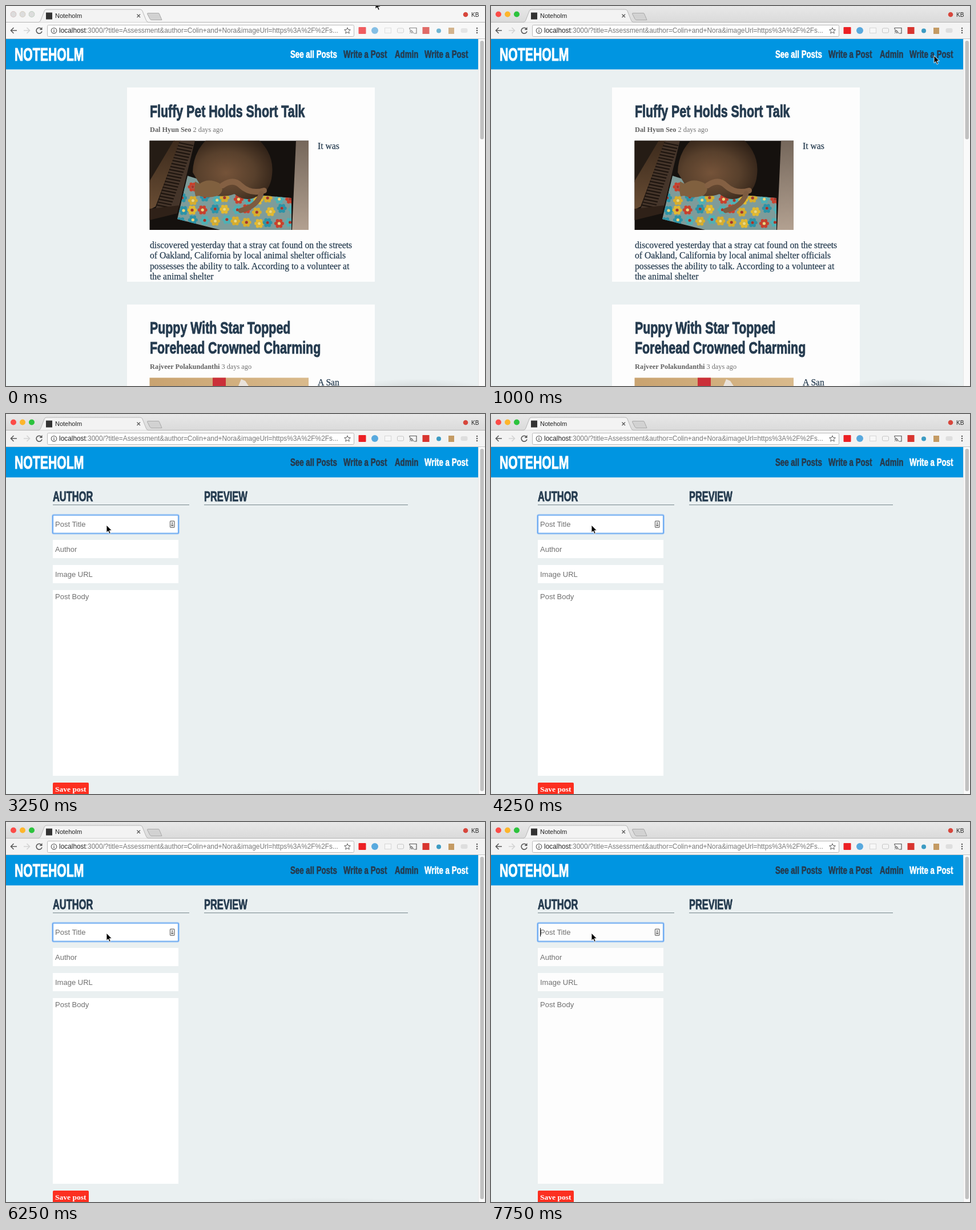
Write an HTML page that moves like this. It is 839 px wide and 667 px high and loops after 8000 ms.

```html
<!DOCTYPE html>
<html lang="en">
<head>
<meta charset="utf-8">
<title>Noteholm</title>
<style>
  html, body { margin: 0; width: 100%; height: 100%; overflow: hidden; background: #eaf0f1; }
  svg { display: block; }
  .ui { font-family: "Liberation Sans", Arial, sans-serif; }
  .serif { font-family: "Liberation Serif", "Times New Roman", serif; }
  .body { font-family: "Liberation Serif", "Times New Roman", serif; stroke: #263c50; stroke-width: .25; }
  .head { font-family: "Liberation Sans", Arial, sans-serif; font-weight: 700; }
  .line { fill: none; stroke: #5a5a5a; stroke-width: 1.6; }
</style>
</head>
<body>
<svg id="stage" width="839" height="667" viewBox="0 0 839 667"></svg>
<script>
const LOOP = 8000;
const INK = '#263c50';
const MIXED = 0.737, CAPS = 0.685; // narrow display face

const rect = (x, y, w, h, fill, more = '') =>
  `<rect x="${x}" y="${y}" width="${w}" height="${h}" fill="${fill}" ${more}/>`;
const circle = (x, y, r, fill, more = '') =>
  `<circle cx="${x}" cy="${y}" r="${r}" fill="${fill}" ${more}/>`;
const poly = (points, fill) => `<polygon points="${points}" fill="${fill}"/>`;
const path = (d, more) => `<path d="${d}" ${more}/>`;
const text = (kind, x, y, size, fill, str, more = '') =>
  `<text class="${kind}" x="${x}" y="${y}" font-size="${size}" fill="${fill}" ${more}>${str}</text>`;
// Heavy face: the outline thickens with the type size.
const head = (x, y, size, fill, str, narrow = MIXED, more = '') =>
  `<text class="head" transform="translate(${x} ${y}) scale(${narrow} 1)" font-size="${size}" fill="${fill}"
    stroke="${fill}" stroke-width="${size * 0.035}" ${more}>${str}</text>`;

function seeded(seed) {
  return () => (seed = (seed * 16807) % 2147483647) / 2147483647;
}

function defs() {
  const fade = (id, a, b, dir = 'x2="0" y2="1"') =>
    `<linearGradient id="${id}" ${dir}><stop stop-color="${a}"/><stop offset="1" stop-color="${b}"/></linearGradient>`;
  return `<defs>
    ${fade('strip', '#e8e8e8', '#dadada')}
    ${fade('wall', '#75675b', '#b3a191')}
    ${fade('plank', '#3c2a1c', '#694d34')}
    ${fade('straw', '#c9a370', '#d9ba8c', 'x2="1"')}
    <radialGradient id="fur" cx=".42" cy=".55" r=".72">
      <stop stop-color="#755339"/><stop offset=".5" stop-color="#58402c"/><stop offset="1" stop-color="#261a12"/>
    </radialGradient>
    <radialGradient id="haze"><stop stop-color="#000" stop-opacity=".09"/><stop offset="1" stop-color="#000" stop-opacity="0"/></radialGradient>
    <clipPath id="photo"><rect x="251.5" y="236.5" width="278.5" height="156.5"/></clipPath>
    <clipPath id="blanket"><polygon points="318,298 420,330 500,337 500,393 375,393 300,374"/></clipPath>
  </defs>`;
}

function tabStrip() {
  return rect(0, 0, 839, 29, 'url(#strip)') +
    rect(0, 0, 839, 29, '#f5f5f5', 'class="idle"') +
    rect(0, 28, 839, 1, '#b4b4b4') +
    ['#fc4b47', '#fdb52b', '#2cc33d'].map((c, i) =>
      circle(13 + 16 * i, 14.5, 5, c) +
      circle(13 + 16 * i, 14.5, 5, '#dcdcdc', 'class="idle" stroke="#cbcbcb" stroke-width=".7"')).join('') +
    path('M56 29 C60 28 61 25 62 22 L67 9 Q68 6 71 6 H235 Q238 6 239 9 L245 24 Q246 28 250 29Z',
      'fill="#f3f3f3" stroke="#b0b0b0" stroke-width=".9"') +
    path('M249 12.5 H267 Q268 12.5 268.6 14 L273 24.5 H255 Q253 24.5 252 22.5 L247.6 14 Q247 12.5 249 12.5Z',
      'fill="#d2d2d2" stroke="#a9a9a9"') +
    rect(70, 11.5, 11, 12, '#333') +
    text('ui', 86, 21, 11, '#222', 'Noteholm') +
    path('M229.5 14.5 l5.5 5.5 m0 -5.5 l-5.5 5.5', 'class="line" style="stroke-width:1.3"') +
    circle(805, 15, 4.3, '#d7463c') +
    text('ui', 815, 19, 10, '#222', 'KB');
}

function toolbar() {
  const url = '<tspan fill="#222">localhost</tspan>:3000/?title=Assessment&amp;author=Colin+and+Nora' +
    '&amp;imageUrl=https%3A%2F%2Fs...';
  const star = Array.from({ length: 10 }, (_, i) => {
    const r = i % 2 ? 2.5 : 5.6, a = i * Math.PI / 5;
    return `${598 + r * Math.sin(a)},${43.5 - r * Math.cos(a)}`;
  }).join(' ');
  const icons =
    rect(617.5, 37, 13, 12, '#ec2024', 'rx="1"') +
    circle(646, 43, 6, '#58a9de') +
    rect(663.5, 38.5, 11, 9, '#f7f7f7', 'stroke="#d6d6d6"') +
    rect(685.5, 39, 11, 8, '#f4f4f4', 'rx="2" stroke="#c5c5c5"') +
    path('M707 41 V38.5 H719 V48 H714.5 M707 47.5 h1 M707 44.7 a3.5 3.5 0 0 1 3.5 3.3 M707 42.2 a6 6 0 0 1 6 5.8',
      'class="line" style="stroke-width:1.2"') +
    rect(729.5, 37, 12, 12, '#d8352f') +
    circle(758, 43.5, 4, '#3c9bc3') +
    rect(775, 38, 10, 11, '#c49a63') +
    rect(796.5, 39, 12, 8, '#dedede', 'rx="3"');
  return rect(0, 29, 839, 29, '#f3f3f3') +
    rect(0, 29, 839, 28, '#f8f8f8', 'class="idle"') + rect(0, 57, 839, 1, '#c4c4c4') +
    path('M19 43 H9 M13.5 38 L8.5 43 L13.5 48', 'class="line"') +
    path('M31 43 H41 M36.5 38 L41.5 43 L36.5 48', 'class="line" style="stroke:#d3d3d3"') +
    path('M62 40 A5 5 0 1 0 63 44.5', 'class="line"') + poly('63.5,37 63.5,42 58.5,42', '#5a5a5a') +
    rect(72.5, 33.5, 537, 20, '#fff', 'rx="2" stroke="#b9b9b9"') +
    circle(84, 43.3, 4.8, 'none', 'stroke="#555" stroke-width="1.1"') +
    rect(83.4, 42.5, 1.3, 3.6, '#555') + rect(83.4, 40.3, 1.3, 1.3, '#555') +
    text('ui', 93, 47, 11.86, '#777', url) +
    `<polygon points="${star}" fill="none" stroke="#5c5c5c"/>` +
    icons + rect(614, 34, 198, 20, '#f8f8f8', 'class="idle" opacity=".28"') +
    [39, 43, 47].map(y => circle(825, y, 1.3, '#5a5a5a')).join('');
}

function siteHeader() {
  const links = [[498, 'See all Posts'], [591, 'Write a Post'], [681, 'Admin'], [733, 'Write a Post']];
  return rect(0, 58, 827, 53.3, '#0095e1') +
    head(15, 96, 31, '#fff', 'NOTEHOLM', CAPS) +
    links.map(([x, label]) => head(x, 91, 18, INK, label, MIXED, 'data-link')).join('');
}

function catPhoto() {
  const rnd = seeded(29), colors = ['#e3b92f', '#c9402c', '#2b93a8', '#d9ae2c', '#4fb0b4'];
  let flowers = '';
  for (let i = 0; i < 44; i++) {
    const x = 306 + (i % 11) * 19 + rnd() * 7, y = 314 + Math.floor(i / 11) * 20 + rnd() * 8;
    const c = colors[Math.floor(rnd() * 5)];
    for (let k = 0; k < 6; k++) {
      const a = k * Math.PI / 3;
      flowers += circle((x + 5.5 * Math.cos(a)).toFixed(1), (y + 5.5 * Math.sin(a)).toFixed(1), 3, c);
    }
    flowers += circle(x.toFixed(1), y.toFixed(1), 2.5, i % 2 ? '#a93327' : '#f0d778');
  }
  let weave = '';
  for (let i = 0; i < 22; i++)
    weave += path(`M${303 - i * 1.9} ${240 + i * 5.2} l25 5`, 'stroke="#1e150f" stroke-width="2.2"');
  return `<g clip-path="url(#photo)">` +
    rect(251, 236, 280, 158, '#15110e') +
    poly('251,236 296,236 251,310', '#251c15') +
    poly('294,236 306,236 262,352 251,358 251,308', 'url(#plank)') +
    poly('305,236 331,236 303,352 262,356', '#45352a') + weave +
    poly('251,356 303,350 300,364 251,376', '#2f2118') +
    poly('508,236 531,236 531,394 501,394', 'url(#wall)') +
    `<g clip-path="url(#blanket)">${rect(295, 295, 210, 100, '#7e9c9a')}${flowers}</g>` +
    path('M327 292 Q328 258 350 236 H444 Q470 262 466 296 Q463 328 438 335 Q420 345 400 330 Q372 340 346 324Z',
      'fill="url(#fur)"') +
    path('M331 308 L339 312 Q354 301 374 311 Q384 322 373 332 Q354 339 338 333 L332 334 Q329 322 331 316Z', 'fill="#80603f"') +
    path('M379 315 Q398 302 411 315 Q428 331 452 324', 'fill="none" stroke="#846043" stroke-width="10" stroke-linecap="round"') +
    path('M447 329 Q440 352 411 359', 'fill="none" stroke="#7d5b40" stroke-width="9" stroke-linecap="round"') + '</g>';
}

function byline(y, name, age) {
  return text('serif', 252, y, 12.3, '#707070',
    `<tspan font-weight="700" fill="#626262">${name}</tspan> ${age} days ago`);
}

function postsPage() {
  const lines = ['discovered yesterday that a stray cat found on the streets',
    'of Oakland, California by local animal shelter officials',
    'possesses the ability to talk. According to a volunteer at', 'the animal shelter'];
  return rect(212, 143, 434, 341, '#fdfdfd') + rect(212, 524, 434, 150, '#fdfdfd') +
    head(252, 195, 29, INK, 'Fluffy Pet Holds Short Talk') +
    byline(221, 'Dal Hyun Seo', 2) + catPhoto() +
    text('body', 546, 251, 15.7, INK, 'It was') +
    lines.map((s, i) => text('body', 252, 425 + 18.3 * i, 15.7, INK, s)).join('') +
    head(252, 575, 29, INK, 'Puppy With Star Topped') +
    head(252, 610, 29, INK, 'Forehead Crowned Charming') +
    byline(637, 'Rajveer Polakundanthi', 3) +
    rect(251.5, 652.5, 278.5, 15, 'url(#straw)') + rect(362, 652.5, 23, 15, '#cb3039') +
    poly('407,667 412,655 419,658 425,667', '#e9e2da') +
    text('body', 546, 666, 15.7, INK, 'A San') +
    `<ellipse cx="720" cy="670" rx="115" ry="16" fill="url(#haze)"/>` + scrollbar(173);
}

function scrollbar(h) {
  return rect(827, 58, 12, 609, '#fafafa') + rect(827, 58, 1, 609, '#e6e6e6') +
    rect(830.5, 61, 6.5, h, '#c1c1c1', 'rx="3.2"');
}

function formPage() {
  const fields = [[178, 31.5, 'Post Title', 198], [221, 32, 'Author', 242],
    [265, 32, 'Image URL', 286], [309, 326, 'Post Body', 325]];
  return head(82, 153, 24, INK, 'AUTHOR', CAPS) + head(347, 153, 24, INK, 'PREVIEW', CAPS) +
    rect(82, 159, 239, 1, '#75858b') + rect(347, 159, 357, 1, '#75858b') +
    fields.map(([y, h, label, base]) =>
      rect(82, y, 220, h, '#fff', 'data-field') + text('ui', 86, base, 13, '#707070', label)).join('') +
    rect(82, 647, 63, 24, '#fc2f20', 'rx="2"') +
    text('serif', 86, 663, 13.5, '#fff', 'Save post', 'font-weight="700"') +
    `<g id="focus">` +
    rect(80.5, 176, 223, 35, 'none', 'rx="3" stroke="#b5d3f5"') +
    rect(82, 177.5, 220, 32, 'none', 'rx="1.5" stroke="#72adf2" stroke-width="2.2"') +
    rect(287.5, 188, 7.5, 11, '#fff', 'rx="1" stroke="#7c7c7c" stroke-width="1.4"') +
    circle(291.2, 191.6, 1.4, '#777') + rect(289.2, 194, 4, 2.6, '#777') + '</g>' +
    rect(86, 186, 1, 15, '#111', 'id="caret"') +
    `<ellipse cx="550" cy="670" rx="215" ry="11" fill="url(#haze)" opacity=".6"/>` + scrollbar(601);
}

const stage = document.getElementById('stage');
stage.innerHTML = defs() + rect(0, 0, 839, 667, '#eaf0f1') + tabStrip() + toolbar() + siteHeader() +
  `<g id="posts">${postsPage()}</g><g id="form">${formPage()}</g>` +
  path('M0 0 V13.2 L3 10.4 L5.1 15.3 L7.3 14.4 L5.2 9.6 H9.3Z',
    'id="cursor" fill="#000" stroke="#fff" stroke-width=".9"');

const all = sel => [...stage.querySelectorAll(sel)];
const [posts, form, focus, caret, cursor] =
  ['#posts', '#form', '#focus', '#caret', '#cursor'].map(s => stage.querySelector(s));
const idle = all('.idle'), links = all('[data-link]'), fields = all('[data-field]');

// time, x, y
const moves = [[0, 647, -8], [250, 682, 7], [500, 777, 86], [750, 776, 87],
  [2250, 249, 166], [2500, 179, 181], [2750, 176, 195]];

const show = (el, on) => el.setAttribute('display', on ? 'inline' : 'none');

function draw(t) {
  const writing = t >= 2000, focused = t >= 2750;
  idle.forEach(el => show(el, t < 1000));
  show(posts, !writing);
  show(form, writing);
  show(focus, focused);
  show(caret, focused && Math.floor((t - 2750) / 500) % 2 === 0);
  links.forEach((el, i) => {
    const color = i === (writing ? 3 : 0) ? '#fff' : INK;
    el.setAttribute('fill', color);
    el.setAttribute('stroke', color);
  });
  fields.forEach(el => el.setAttribute('fill', t < 7500 ? '#fff' : '#fdfdfd'));
  const [, x, y] = moves.filter(m => m[0] <= t).pop();
  cursor.setAttribute('transform', `translate(${x} ${y})`);
}

const start = performance.now();
function tick() {
  draw((performance.now() - start) % LOOP);
  requestAnimationFrame(tick);
}
tick();
</script>
</body>
</html>
```
